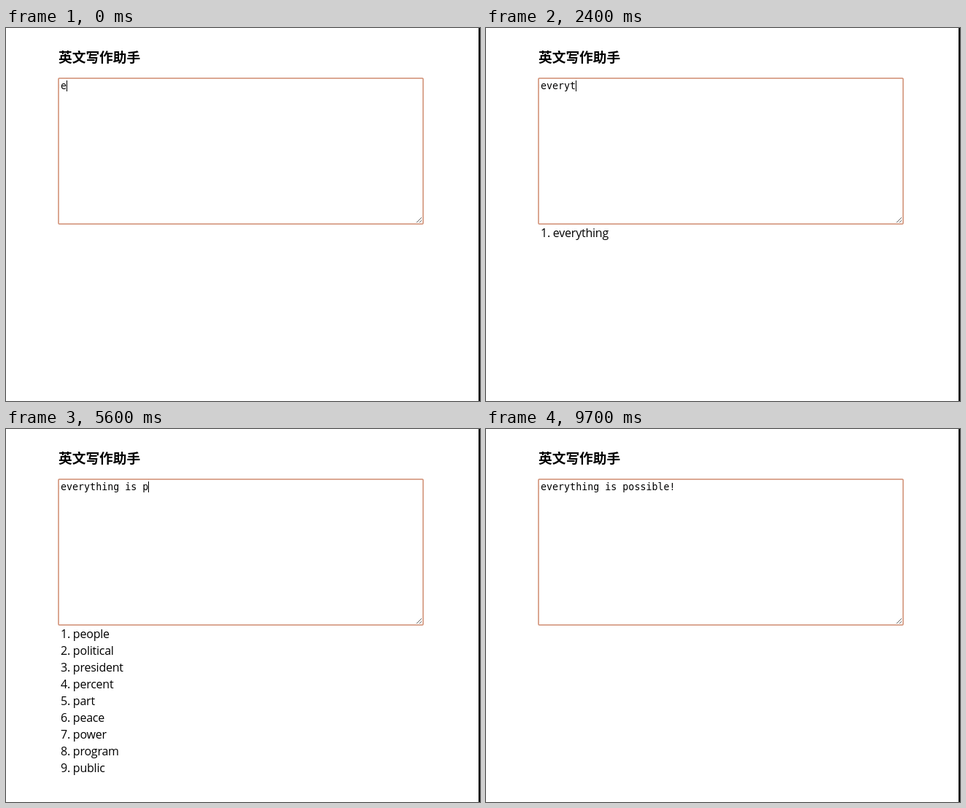
These frames come from a looping animation (650x512 px, 10000 ms). An HTML page:

```html
<!DOCTYPE html>
<html lang="zh-CN">
<head>
<meta charset="utf-8">
<title>英文写作助手</title>
<style>
html, body { margin: 0; width: 100%; height: 100%; overflow: hidden; background: #fff; }
svg { display: block; }
text { white-space: pre; }
.title { font: bold 18.72px "Noto Sans CJK SC", "Noto Sans CJK", sans-serif; }
.typed { font: 13.333px "DejaVu Sans Mono", monospace; }
.list { font: 16px "Open Sans", "Noto Sans", sans-serif; letter-spacing: -0.23px; }
</style>
</head>
<body>
<svg width="650" height="512" viewBox="0 0 650 512">
  <rect x="648" width="2" height="512"/>
  <text class="title" x="72" y="47">英文写作助手</text>
  <rect x="72" y="69" width="500" height="200" rx="1" fill="#fff" stroke="#d08c70" stroke-width="1.5"/>
  <path d="M563 267l7-7M567 267l3-3" stroke="#666" fill="none"/>
  <text class="typed" id="typed" x="75" y="84"></text>
  <rect id="caret" y="72" width="1" height="15"/>
  <g class="list" id="list"></g>
</svg>
<script>
const LOOP = 10000, CHAR = 8.027;
const $ = id => document.getElementById(id);

// [time, typed text]
const typing = [
  [0, 'e'], [500, 'ev'], [1000, 'eve'], [1600, 'ever'], [2000, 'every'],
  [2300, 'everyt'], [2500, 'everyth'], [2800, 'everythi'], [3100, 'everythin'],
  [3400, 'everything'], [3900, 'everything '], [4400, 'everything i'],
  [4700, 'everything is'], [5100, 'everything is '], [5400, 'everything is p'],
  [5900, 'everything is po'], [6400, 'everything is pos'],
  [6700, 'everything is poss'], [7500, 'everything is possi'],
  [7800, 'everything is possible'], [8700, 'everything is possible!']
];

// [time, suggestions]
const hints = [
  [0, ''],
  [200, 'every each even economic ever energy education end effort'],
  [700, 'even every ever everything evidence event everyone events eventually'],
  [1200, 'even every ever everything event everyone events eventually everybody'],
  [1700, 'every ever everything everyone everybody everywhere everyday evergreen everlasting'],
  [2100, 'every everything everyone everybody everywhere everyday everyman everytime everyones'],
  [2400, 'everything'],
  [4000, 'is from that we in they to else possible'],
  [4500, 'in is it if into its important issues increase'],
  [4800, 'is issue issues island isolated isolation islands issued isolate'],
  [5200, 'a the not that to in an no our'],
  [5600, 'people political president percent part peace power program public'],
  [6000, 'political power policy point possible poor position policies population'],
  [6500, 'possible position positive post possibility positions possess posed postal'],
  [6800, 'possible possibility possess possibly possession possibilities possessed possessions possesses'],
  [7600, 'possible possibility possibly possibilities possibile possies possie possiblest possibles'],
  [9100, '']
];

const rows = Array.from({ length: 9 }, (_, i) => {
  const row = document.createElementNS('http://www.w3.org/2000/svg', 'text');
  row.setAttribute('x', 75);
  row.setAttribute('y', 287 + 23 * i);
  return $('list').appendChild(row);
});

const at = (steps, t) => steps.findLast(step => step[0] <= t)[1];

function draw(t) {
  const typed = at(typing, t);
  const words = at(hints, t).split(' ').filter(Boolean);
  $('typed').textContent = typed;
  $('caret').setAttribute('x', Math.round(75 + typed.length * CHAR));
  $('caret').setAttribute('visibility', t < 9700 ? 'visible' : 'hidden');
  rows.forEach((row, i) => {
    row.textContent = words[i] ? `${i + 1}. ${words[i]}` : '';
  });
}

const start = performance.now();
function tick() {
  draw((performance.now() - start) % LOOP);
  requestAnimationFrame(tick);
}
tick();
</script>
</body>
</html>
```
